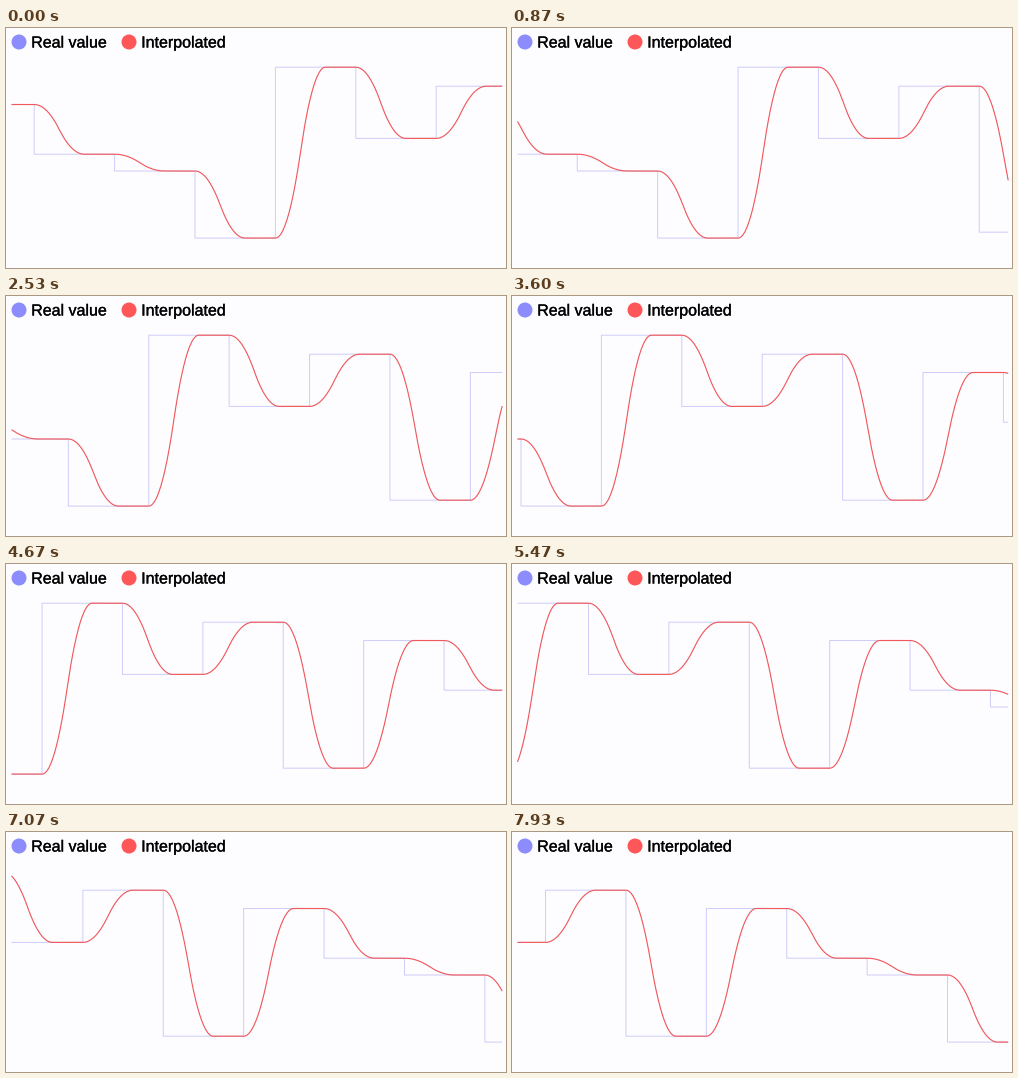
A matplotlib script for the animation above (8 s loop, 500 by 240 pixels).

```python
import numpy as np
import matplotlib.pyplot as plt
from matplotlib.animation import FuncAnimation
from matplotlib.patches import Circle
from matplotlib.patheffects import withStroke

W, H, DPI = 500, 240, 100
LOOP_MS, TICK_MS = 8000, 10
SCROLL_MS = LOOP_MS / 120          # the chart moves 15 times a second
PX = 72 / DPI                      # points per pixel

LEFT, RIGHT = 5.5, 496.2           # visible span of the chart
SPEED = 0.05                       # scroll, px per ms
STEP = 80.4                        # distance between value changes
FIRST = 28.2                       # first value change at time zero
EASE = 50.0                        # length of one transition
LEVELS = np.array([76.5, 126.2, 143, 210.1, 39.2, 110.4, 58.2, 204.2])

BLUE, RED = "#8c8cfd", "#ff5658"
STAIR, CURVE = "#cecdf9", "#f0585c"


def ease(t):
    t = np.clip(t, 0, 1)
    return np.where(t < 0.5, 2 * t * t, 1 - 2 * (1 - t) ** 2)


def level(k):
    return LEVELS[k % len(LEVELS)]


def smooth_curve(scroll):
    x = np.linspace(LEFT, RIGHT, 500)
    pos = x + scroll - FIRST
    k = np.floor(pos / STEP).astype(int)
    a, b = level(k), level(k + 1)
    return x, a + (b - a) * ease((pos - k * STEP) / EASE)


def stair_curve(scroll):
    first, last = (int(np.floor((x + scroll - FIRST) / STEP))
                   for x in (LEFT, RIGHT))
    edges = FIRST + np.arange(first + 1, last + 1) * STEP - scroll
    x = np.concatenate([[LEFT], np.repeat(edges, 2), [RIGHT]])
    y = np.repeat(level(np.arange(first + 1, last + 2)), 2)
    return x, y


fig = plt.figure(figsize=(W / DPI, H / DPI), dpi=DPI, facecolor="#fdfdff")
ax = fig.add_axes([0, 0, 1, 1])
ax.set_xlim(0, W)
ax.set_ylim(H, 0)
ax.axis("off")


def legend_item(x, color, label):
    ax.add_patch(Circle((x, 14), 7.5, fc=color, ec="none"))
    ax.text(x + 12.2, 19.5, label, family="Liberation Sans", size=16 * PX,
            color="black", va="baseline",
            path_effects=[withStroke(linewidth=0.3 * PX, foreground="black")])


legend_item(13, BLUE, "Real value")
legend_item(123, RED, "Interpolated")

stairs, = ax.plot([], [], color=STAIR, lw=1.0 * PX, snap=False,
                  solid_capstyle="butt", solid_joinstyle="miter")
curve, = ax.plot([], [], color=CURVE, lw=1.15 * PX, snap=False,
                 solid_capstyle="butt", solid_joinstyle="round")


def draw(i):
    # hold each scroll position until the next one is due, to the nearest tick
    moves = int((i + 0.5) * TICK_MS / SCROLL_MS)
    scroll = SPEED * moves * SCROLL_MS
    stairs.set_data(*stair_curve(scroll))
    curve.set_data(*smooth_curve(scroll))
    return stairs, curve


anim = FuncAnimation(fig, draw, frames=LOOP_MS // TICK_MS, interval=TICK_MS,
                     repeat=True, repeat_delay=0, blit=False)
plt.show()
```
